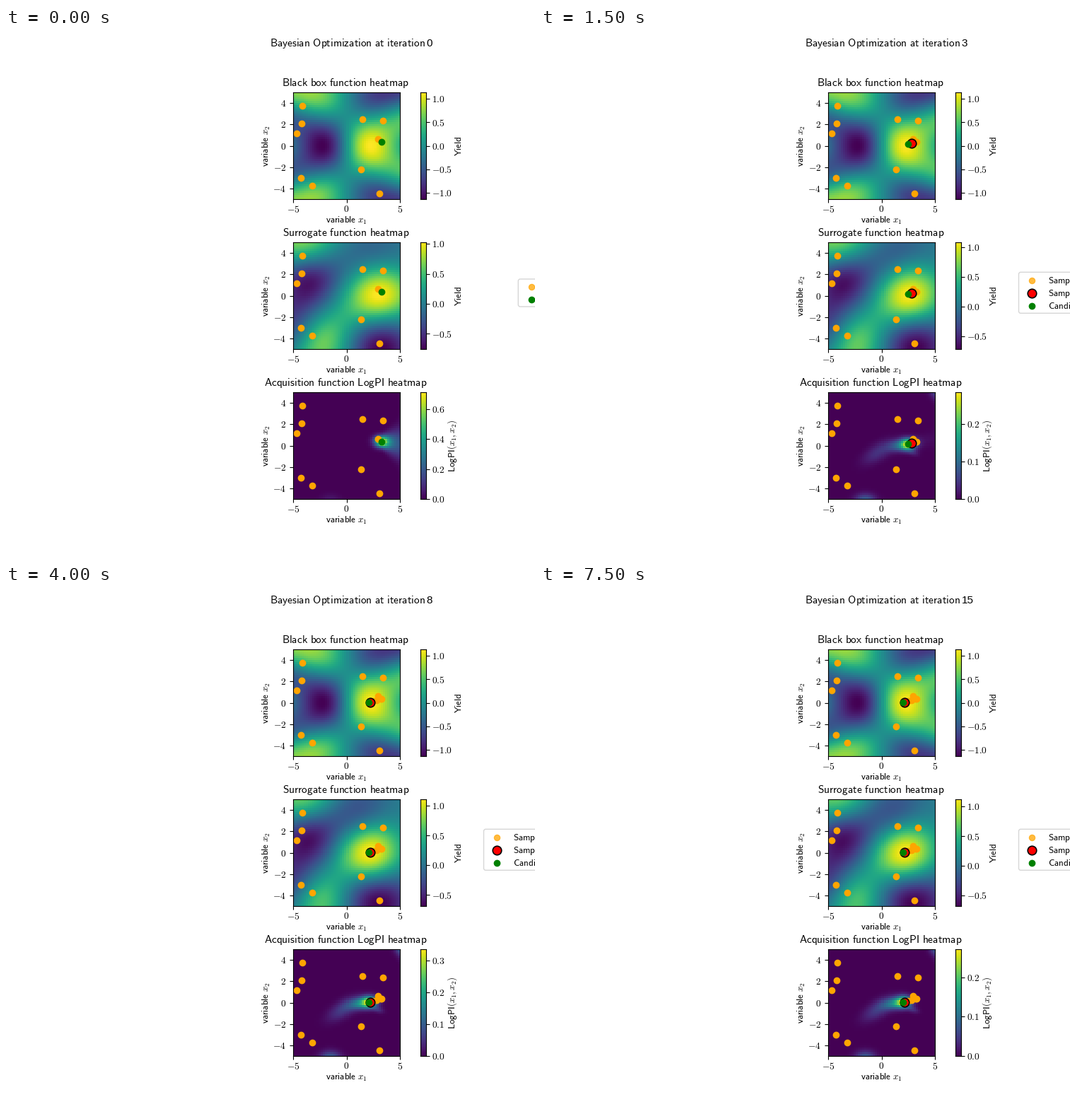
A matplotlib script that plays this animation: 748x748 px, repeating every 8 s.

```python
import numpy as np
import matplotlib.pyplot as plt
from matplotlib.animation import FuncAnimation
from matplotlib.patches import FancyBboxPatch

plt.rcParams["mathtext.fontset"] = "cm"

SIZE, FRAMES, STEP_MS = 748, 16, 500
LEFT, TOP, SIDE, PITCH = 406, 91, 151, 212
BAR_LEFT, BAR_WIDTH = 586.2, 7.55
MID = LEFT + SIDE / 2
TITLE, BODY, DIGITS = 11.05, 9.4, 9.7

centers = np.linspace(-4.9, 4.9, 50)
X, Y = np.meshgrid(centers, centers)

samples = np.array([
    (-4.14, 3.71), (-4.2, 2.1), (-4.7, 1.18), (-4.3, -3.02), (-3.2, -3.72),
    (1.49, 2.48), (3.42, 2.35), (2.93, 0.62), (1.39, -2.22), (3.05, -4.5)])


def search(k):
    """How far the optimizer still is from settling, 1 down to 0."""
    return 1 / (1 + (k / 2.3) ** 3)


def candidate(k):
    s = search(k)
    wobble = .06 * (1 - s) * np.sin(1.9 * (k - 12.8))
    return 2.1 + 1.17 * s + wobble, .03 + .34 * s - wobble / 3


candidates = np.array([candidate(k) for k in range(FRAMES)])


def black_box(x, y):
    r = x / (2.25 + .04 * y ** 2)
    wave = np.pi / 5 * y
    return (.25 * np.tanh(x / 2) + .94 * r * np.exp((1 - r ** 2) / 2) * np.cos(wave)
            - .22 * (x / 5) ** 3 * np.cos(2 * wave))


def kernel(ax, ay, bx, by, length=2.3):
    d2 = np.subtract.outer(ax, bx) ** 2 + np.subtract.outer(ay, by) ** 2
    return np.exp(-d2 / (2 * length ** 2))


def surrogate(k):
    """Gaussian process mean given everything sampled so far."""
    x, y = np.vstack([samples, candidates[:k]]).T
    values = black_box(x, y)
    mean = values[:len(samples)].mean()
    gain = np.linalg.solve(kernel(x, y, x, y) + .02 * np.eye(len(x)), values - mean)
    return mean + kernel(X, Y, x, y) @ gain


def blob(x, y, sx, sy, angle, amp):
    c, s = np.cos(np.radians(angle)), np.sin(np.radians(angle))
    u, v = c * (X - x) + s * (Y - y), c * (Y - y) - s * (X - x)
    return amp * np.exp(-(u / sx) ** 2 / 2 - (v / sy) ** 2 / 2)


def fan(x, y, opening, tilt):
    d = X - x
    ahead = np.maximum(d, 0)
    width = .32 + opening * ahead
    return (np.exp(-((Y - y - tilt * d) / width) ** 2 / 2 - ahead / 2.5)
            / (1 + np.exp(-5 * (d + .45))))


def acquisition(k):
    x, y = candidates[k]
    s, first = search(k), np.exp(-2 * k)
    late = 1 - s
    return (blob(x, y, .48, .36, 0, .6)
            + s ** 2 * .6 * fan(x, y, .1 + .28 * first, .2 - .3 * first)
            + blob(x - .7, y - .1, .8, .36, 8, .4 * late)
            + blob(-.3, -.6, 1.1, .5, 33, .03 * (1 - first) + .13 * late)
            + blob(2.9, -.6, .4, .2, -20, .12 * late)
            + blob(5.2, 5, .4, .8, 35, .3 * late)
            + blob(-1.5, -5.2, .65, .45, 0, .08 + .2 * (1 - first)))


def mean_range(k):
    return -.68 - .075 * np.exp(-k / 4), 1.126 - .1 * np.exp(-k / 4)


def acquisition_peak(k):
    return .3 + .45 * np.exp(-1.6 * k) + .04 * np.sin((k - 4) / 2)


fig = plt.figure(figsize=(SIZE / 100, SIZE / 100), dpi=100, facecolor="white")


def box(left, top, width, height):
    return fig.add_axes([left / SIZE, 1 - (top + height) / SIZE,
                         width / SIZE, height / SIZE])


page = box(0, 0, SIZE, SIZE)
page.set(xlim=(0, SIZE), ylim=(SIZE, 0))
page.axis("off")
page.set_zorder(-1)


def sans(text):
    return r"\mathsf{" + text.replace(" ", r"\ ") + "}"


def label(x, y, text, size=BODY, ha="center", rotation=0):
    return page.text(x, y, f"${text}$", fontsize=size, ha=ha, va="baseline",
                     rotation=rotation, rotation_mode="anchor")


def dots(ax, points, color, **style):
    x, y = np.transpose(points)
    opts = dict(ms=6, mew=1, mec=color) | style
    return ax.plot(x, y, "o", color=color, **opts)[0]


RED = dict(ms=9, mew=1.2, mec="black")
PALE = dict(alpha=.75, mew=.8)


class Panel:
    def __init__(self, row, title, bar_label, bar_x):
        top = TOP + row * PITCH
        self.ax = box(LEFT, top, SIDE, SIDE)
        self.image = self.ax.imshow(np.zeros_like(X), extent=(-5, 5, -5, 5),
                                    origin="lower", vmin=0, vmax=1,
                                    interpolation="nearest", aspect="auto")
        xs, ys = range(-5, 6, 5), range(-4, 5, 2)
        self.ax.set_xticks(xs, [f"${v}$" for v in xs])
        self.ax.set_yticks(ys, [f"${v}$" for v in ys])
        self.ax.tick_params(labelsize=DIGITS)
        self.ax.tick_params(axis="x", pad=2.5)
        self.ax.set(xlim=(-5, 5), ylim=(-5, 5))
        self.seen = dots(self.ax, samples, "orange")
        self.last = dots(self.ax, samples[:1], "red", **RED)
        self.next = dots(self.ax, samples[:1], "green")

        self.bar = box(BAR_LEFT, top, BAR_WIDTH, SIDE)
        self.strip = self.bar.imshow(np.linspace(0, 1, 256)[:, None], origin="lower",
                                     extent=(0, 1, 0, 1), aspect="auto")
        self.bar.set_xticks([])
        self.bar.yaxis.tick_right()
        self.bar.tick_params(axis="y", pad=2.6, labelsize=DIGITS)

        label(MID - 1, top - 9, sans(title), TITLE)
        label(MID, top + SIDE + 33.5, sans("variable") + r"\ x_1")
        label(371.5, top + SIDE / 2, sans("variable") + r"\ x_2", rotation=90)
        label(bar_x, top + SIDE / 2, bar_label, rotation=90)

    def show(self, field, low, high, step):
        self.image.set_data((field - field.min()) / np.ptp(field))
        ticks = np.arange(np.ceil(low / step), np.floor(high / step) + 1) * step + 0.0
        self.strip.set_extent((0, 1, low, high))
        self.bar.set_ylim(low, high)
        self.bar.set_yticks(ticks, [f"${v:.1f}$" for v in ticks])

    def mark(self, k):
        self.seen.set_data(*np.vstack([samples, candidates[:k]]).T)
        self.last.set_data(*candidates[max(k - 1, 0)][:, None])
        self.last.set_visible(k > 0)
        self.next.set_data(*candidates[k][:, None])


def legend(left, middle, rows):
    height = 20 + 19 * (len(rows) - 1)
    frame = FancyBboxPatch((left, middle - height / 2), 200, height, fc="white",
                           ec="0.8", lw=1, alpha=.8,
                           boxstyle="round,pad=0,rounding_size=2.8")
    parts = [page.add_patch(frame)]
    for i, (color, text, style) in enumerate(rows):
        y = middle + .2 + 18 * (i - (len(rows) - 1) / 2)
        parts.append(dots(page, [(left + 18.5, y)], color, **style))
        parts.append(label(left + 41.5, y + 4, sans(text), ha="left"))
    return parts


sampled = ("orange", "Samples", PALE)
latest = ("red", "Sample at iteration", RED)
upcoming = ("green", "Candidate", {})
first_legend = legend(724.3, 374.5, [sampled, upcoming])
full_legend = legend(675.5, 374.3, [sampled, latest, upcoming])

label(373, 26, sans("Bayesian Optimization at iteration"), TITLE, ha="left")
counter = page.text(594.5, 26, "", fontsize=11, family="Liberation Sans")

truth = Panel(0, "Black box function heatmap", sans("Yield"), 643.7)
model = Panel(1, "Surrogate function heatmap", sans("Yield"), 643.7)
acq = Panel(2, "Acquisition function LogPI heatmap",
            sans("LogPI") + "(x_1, x_2)", 634.5)
truth.show(black_box(X, Y), -1.13, 1.13, .5)


def update(k):
    counter.set_text(str(k))
    model.show(surrogate(k), *mean_range(k), .5)
    peak = acquisition_peak(k)
    acq.show(acquisition(k), 0, peak, .2 if peak > .5 else .1)
    for panel in (truth, model, acq):
        panel.mark(k)
    for part in first_legend:
        part.set_visible(k == 0)
    for part in full_legend:
        part.set_visible(k > 0)
    return []


anim = FuncAnimation(fig, update, frames=FRAMES, interval=STEP_MS,
                     repeat=True, repeat_delay=0, blit=False)
plt.show()
```
